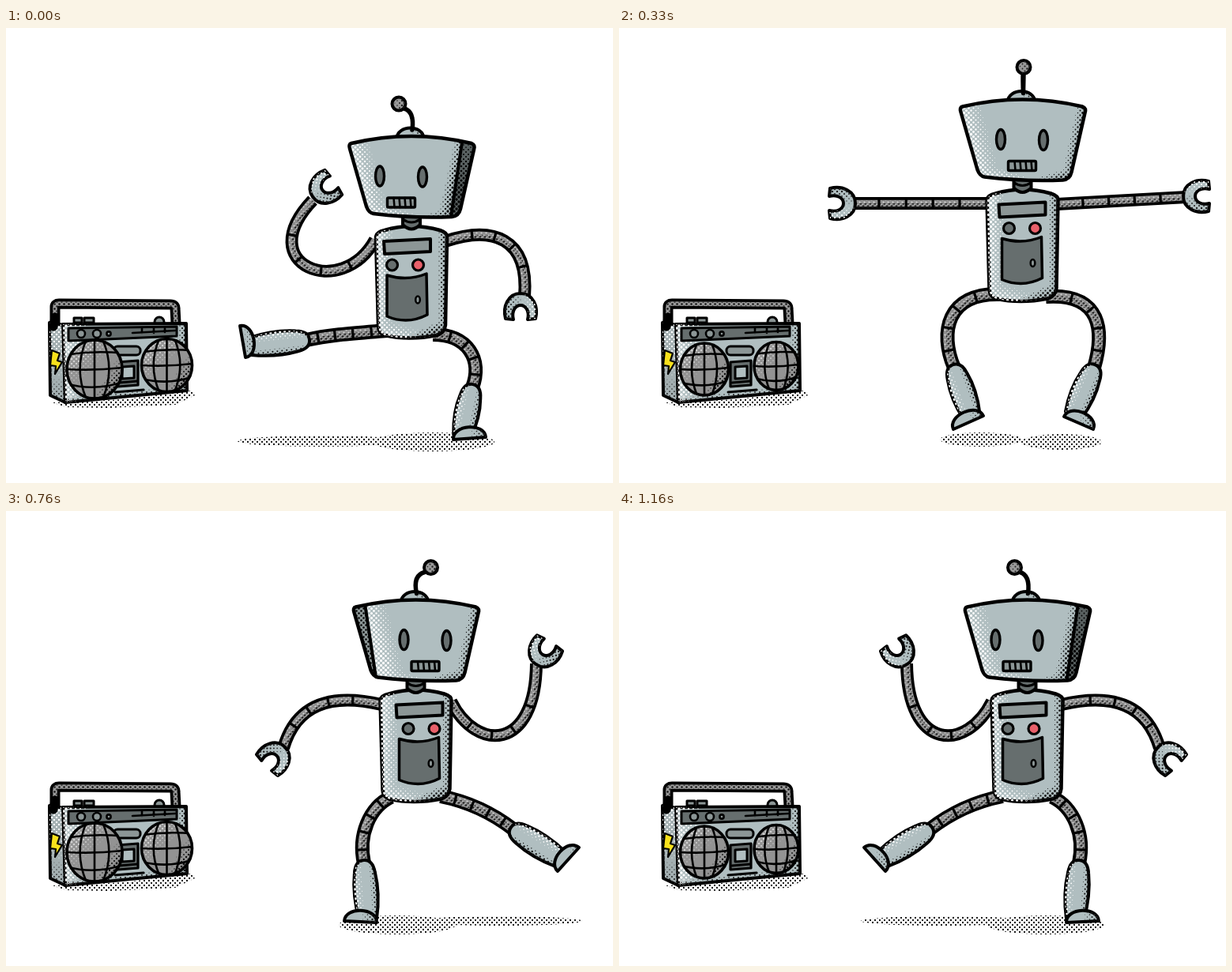
Recreate the animation shown at these times as an HTML page with a canvas. Size 768 by 576 pixels, loop 1260 ms.

```html
<!DOCTYPE html>
<html lang="en">
<head>
<meta charset="utf-8">
<title>Dancing robot</title>
<style>
html, body { margin: 0; width: 100%; height: 100%; overflow: hidden; background: #fff; }
canvas { display: block; width: 768px; height: 576px; }
</style>
</head>
<body>
<canvas id="stage" width="768" height="576"></canvas>
<script>
const ctx = document.getElementById('stage').getContext('2d');
const INK = '#000', METAL = '#b0bec0', TUBE = '#8e8e8e', DARK = '#666e6e', MID = '#8c9696', RED = '#e8606a';
const AXIS = 1035; // the mirrored x of a point is AXIS - x

// Arms: cubic curve. Hands: x, y, angle. Legs: cubic curve, ankle, heel, toe.
const kick = {
  at: [513, 0], side: 1,
  armL: [467, 268, 425, 345, 310, 300, 388, 218], handL: [402, 204, -35],
  armR: [556, 270, 615, 250, 662, 265, 656, 340], handR: [651, 353, 90],
  legL: [482, 383, 445, 386, 410, 388, 380, 395, 309, 403, 303, 417, 296, 377],
  legR: [540, 388, 585, 388, 603, 420, 590, 455, 577, 517, 566, 521, 607, 518],
  shade: [[400, 523, 107, 7], [540, 524, 78, 12]]
};
const step = {
  at: [516.5, -24.5], side: 1,
  armL: [472, 241, 440, 305, 365, 305, 364, 193], handL: [355, 180, -122],
  armR: [560, 245, 625, 230, 668, 245, 684, 300], handR: [694, 311, 45],
  legL: [485, 361, 450, 368, 420, 382, 393, 403, 333, 441, 337, 456, 310, 426],
  legR: [548, 362, 575, 375, 590, 410, 582, 446, 577, 517, 566, 521, 607, 519],
  shade: [[410, 519, 104, 6], [540, 524, 74, 12]]
};
const squat = {
  at: [510.5, -46.5], side: 0,
  armL: [465, 222, 408, 222, 353, 222, 294, 222], handL: [282, 222, -180],
  armR: [554, 223, 609, 220, 663, 217, 718, 214], handR: [731, 213, 0],
  legL: [482, 337, 415, 335, 405, 385, 424, 430, 446, 491, 461, 491, 423, 508],
  legR: [540, 340, 612, 335, 614, 385, 601, 430, 575, 490, 563, 492, 600, 508],
  shade: [[458, 521, 52, 9], [560, 524, 51, 10]]
};

const flip = v => v.map((n, i) => i % 2 ? n : AXIS - n);
const flipHand = h => [AXIS - h[0], h[1], 180 - h[2]];
const mirror = p => ({
  at: flip(p.at), side: -p.side,
  armL: flip(p.armR), handL: flipHand(p.handR), armR: flip(p.armL), handR: flipHand(p.handL),
  legL: flip(p.legR), legR: flip(p.legL),
  shade: p.shade.map(e => [AXIS - e[0], ...e.slice(1)]).reverse()
});
const mid = (a, b) => Array.isArray(a) ? a.map((n, i) => mid(n, b[i])) : (a + b) / 2;
const midHand = (a, b) => {
  const turn = ((b[2] - a[2]) % 360 + 540) % 360 - 180;
  return [...mid(a.slice(0, 2), b.slice(0, 2)), a[2] + turn / 2];
};
const between = (a, b) => Object.fromEntries(Object.keys(a).map(k =>
  [k, (k.startsWith('hand') ? midHand : mid)(a[k], b[k])]));

const kickR = mirror(kick), stepR = mirror(step);
const dipL = between(step, squat), dipR = between(stepR, squat);

// start time, pose, speaker swell
const LOOP = 1260;
const beats = [
  [0, kick, 1], [130, step, 1], [230, dipL, .5], [330, squat, 0], [430, dipR, 0], [530, stepR, 0],
  [630, kickR, 1], [760, stepR, 1], [860, dipR, .5], [960, squat, 0], [1060, dipL, 0], [1160, step, 0]
];

function shape(path, fill, width = 4) {
  if (fill) { ctx.fillStyle = fill; ctx.fill(path); }
  if (width) { ctx.lineWidth = width; ctx.strokeStyle = INK; ctx.stroke(path); }
}
const poly = (...v) => new Path2D('M' + v.join(' ') + 'Z');
const line = (d, w) => shape(new Path2D(d), null, w);
function oval(x, y, rx, ry = rx) {
  const p = new Path2D();
  p.ellipse(x, y, rx, ry, 0, 0, 7);
  return p;
}
function box(x, y, w, h, r = 0) {
  const p = new Path2D();
  p.roundRect(x, y, w, h, r);
  return p;
}

// Halftone screen inside a path; size(x, y) gives each dot's radius.
function dots(path, color, [x0, y0, x1, y1], size) {
  ctx.save();
  ctx.clip(path);
  ctx.fillStyle = color;
  ctx.beginPath();
  for (let y = y0, row = 0; y <= y1; y += 3, row++)
    for (let x = x0 + row % 2 * 3; x <= x1; x += 6) {
      const r = Math.min(1.7, size(x, y));
      if (r > .4) { ctx.moveTo(x + r, y); ctx.arc(x, y, r, 0, 7); }
    }
  ctx.fill();
  ctx.restore();
}
function screen(color, r) {
  const tile = document.createElement('canvas');
  tile.width = tile.height = 6;
  const g = tile.getContext('2d');
  g.fillStyle = color;
  for (const c of [1.5, 4.5]) { g.beginPath(); g.arc(c, c, r, 0, 7); g.fill(); }
  return ctx.createPattern(tile, 'repeat');
}
const whiteDots = screen('#d4d4d4', 1.1), blackDots = screen('#111', 1.25);

function tube(v, width, bands) {
  const [x0, y0, x1, y1, x2, y2, x3, y3] = v;
  const p = new Path2D(`M${x0} ${y0}C${x1} ${y1} ${x2} ${y2} ${x3} ${y3}`);
  const pass = (style, w) => { ctx.strokeStyle = style; ctx.lineWidth = w; ctx.stroke(p); };
  ctx.lineCap = 'butt';
  pass(INK, width);
  pass(TUBE, width - 7.5);
  pass(whiteDots, width - 8);
  ctx.save();
  ctx.translate(1.5, 2);
  pass(blackDots, width - 12);
  ctx.restore();
  for (const t of bands) {
    const u = 1 - t;
    const at = i => u * u * u * v[i] + 3 * u * u * t * v[i + 2] + 3 * u * t * t * v[i + 4] + t * t * t * v[i + 6];
    const slope = i => u * u * (v[i + 2] - v[i]) + 2 * u * t * (v[i + 4] - v[i + 2]) + t * t * (v[i + 6] - v[i + 4]);
    const dx = slope(0), dy = slope(1), k = (width / 2 - 1) / Math.hypot(dx, dy);
    const x = at(0), y = at(1);
    line(`M${x - dy * k} ${y + dx * k}L${x + dy * k} ${y - dx * k}`, 3.2);
  }
  ctx.lineCap = 'round';
}

const claw = new Path2D('M15-19C0-23-17-16-17 0C-17 16 0 23 15 19L16 9C5 12-2 6-2 0C-2-6 5-12 16-9Z');
function hand([x, y, deg]) {
  ctx.save();
  ctx.translate(x, y);
  ctx.rotate(deg * Math.PI / 180);
  shape(claw, METAL);
  dots(claw, '#222', [-18, -21, 16, 21], (a, b) => .5 + b / 22);
  dots(claw, '#fff', [-18, -21, 16, 21], (a, b) => .3 - b / 20);
  ctx.restore();
  shape(new Path2D(), null, 0);
}

function leg(v) {
  tube(v.slice(0, 8), 18, [.18, .4, .62, .84]);
  const [kx, ky, ex, ey, hx, hy, tx, ty] = v.slice(6);
  const len = Math.hypot(ex - kx, ey - ky), turn = Math.atan2(ey - ky, ex - kx);
  const shin = new Path2D(`M-4 0C-4-9 4-12 12-13C${len * .5}-17 ${len * .8}-14 ${len}-11L${len} 11` +
    `C${len * .8} 14 ${len * .5} 17 12 13C4 12-4 9-4 0Z`);
  const light = Math.cos(turn) < -.5 ? 1 : Math.sin(turn) > .7 ? 1 : -1;
  const area = [-4, -16, len, 16];
  ctx.save();
  ctx.translate(kx, ky);
  ctx.rotate(turn);
  shape(shin, METAL);
  dots(shin, '#fff', area, (x, y) => light * y / 9);
  dots(shin, '#111', area, (x, y) => (-light * y - 4) / 6);
  ctx.restore();
  // The sole is straight and the dome rises toward the knee.
  const span = Math.hypot(tx - hx, ty - hy);
  let nx = (hy - ty) / span, ny = (tx - hx) / span;
  if (nx * (kx - ex) + ny * (ky - ey) < 0) { nx = -nx; ny = -ny; }
  nx *= 19; ny *= 19;
  const foot = new Path2D(`M${hx} ${hy}C${hx + nx} ${hy + ny} ${tx + nx} ${ty + ny} ${tx} ${ty}Z`);
  shape(foot, METAL);
  const cx = (hx + tx) / 2, cy = (hy + ty) / 2;
  dots(foot, '#222', [cx - 30, cy - 30, cx + 30, cy + 30], x => (x - cx + 3) / 14);
}

function antenna(s) {
  const dome = new Path2D('M-19 140C-17 122 14 122 16 140Z');
  shape(dome, METAL);
  dots(dome, '#222', [-19, 124, 16, 140], x => (x + 3) / 12);
  line(`M1 129Q${4 * s} 106 ${-10 * s + 1} 102`, 5.5);
  if (!s) line('M1 128L1.5 104', 5.5);
  const ball = oval(-17.5 * s + 1.5, 96, 8.5);
  shape(ball, '#999');
  dots(ball, '#222', [-30, 86, 30, 106], x => .9 + (x + 17 * s) / 14);
}

function torso(s) {
  const body = new Path2D('M-45 264Q-44 258-34 256Q0 246 36 256Q45 259 45 264L43 376Q42 386 32 389Q-3 396-34 389Q-42 386-42 377Z');
  const area = [-46, 250, 46, 394];
  shape(body, METAL, 4.5);
  dots(body, '#fff', area, (x, y) => Math.max(2 - (x + 43) / 13, (y - 368) / 14 - (x + 15) / 40));
  dots(body, '#111', area, (x, y) => Math.max((x - 30) / 8, (y + x * .5 - 384) / 9));
  ctx.save();
  ctx.translate(-5 * s, 0);
  shape(poly(-30, 270, 29, 267, 29, 283, -29, 286), MID);
  const door = new Path2D('M-26 313Q0 321 24 311L25 363Q0 376-26 365Z');
  shape(door, DARK, 3.5);
  shape(oval(13 + (s < 0 ? 1 : 0), 344, 2.8, 4.5), MID, 2.6);
  ctx.translate(-2.5 * s, 0);
  shape(oval(-17, 300, 7), DARK, 3.2);
  shape(oval(16, 300, 7), RED, 3.2);
  ctx.restore();
}

function head(s) {
  const neck = new Path2D('M-11 234L-11 249Q0 260 11 249L11 234Z');
  shape(neck, DARK);
  line('M-11 242Q0 250 11 242', 3);
  antenna(s);
  const skull = new Path2D('M-76 146Q0 128 76 146Q81 148 79 154L62 229Q60 238 51 239Q0 241-48 235Q-54 234-57 226L-78 153Q-80 147-76 146Z');
  const area = [-80, 136, 81, 241];
  const left = y => -79 + (y - 148) * .27, right = y => 80 - (y - 148) * .22;
  shape(skull, METAL, 0);
  dots(skull, '#fff', area, (x, y) => {
    const edge = left(y) + (s < 0 ? -15 * s : 0);
    return Math.max(2 - (x - edge) / 17, (y - 222) / 9 - (x + 25) / 30);
  });
  dots(skull, '#111', area, (x, y) => {
    const edge = right(y) - (s > 0 ? 15 * s : 0);
    return Math.max(1.7 - (edge - x) / 9, (y + x * .3 - 238) / 8);
  });
  if (s) {
    const k = Math.sign(s), top = k * (80 - 15 * Math.abs(s)), low = k * (60 - 11 * Math.abs(s));
    const panel = poly(top, 138, k * 90, 138, k * 72, 245, low, 245);
    ctx.save();
    ctx.clip(skull);
    shape(panel, s > 0 ? '#596161' : MID);
    dots(panel, '#000', [-90, 136, 90, 242], (x, y) => s > 0 ? (y - 130) / 60 + .5 : 1.3);
    ctx.restore();
  }
  shape(skull, null, 4.5);
  ctx.save();
  ctx.translate(-12.5 * s - 1, 0);
  shape(oval(-26.5, 187.5, 5.5, 12.5), DARK, 3.4);
  shape(oval(27.5, 188.5, 5.5, 12.5), DARK, 3.4);
  shape(box(-17, 215, 35, 12, 1.5), MID, 3.4);
  for (let x = -9; x < 15; x += 7) line(`M${x} 215L${x + 1} 227`, 2.6);
  ctx.restore();
}

function robot(p) {
  const floor = new Path2D();
  for (const [x, y, rx, ry] of p.shade) {
    floor.moveTo(x + rx, y);
    floor.ellipse(x, y, rx, ry, 0, 0, 7);
  }
  dots(floor, '#111', [285, 509, 746, 538], () => 1.15);
  leg(p.legL);
  leg(p.legR);
  const bands = [.2, .4, .6, .8];
  tube(p.armL, 16, bands);
  tube(p.armR, 16, bands);
  hand(p.handL);
  hand(p.handR);
  ctx.save();
  ctx.translate(...p.at);
  torso(p.side);
  head(p.side);
  ctx.restore();
}

function speaker(x, y, rx, ry) {
  const cone = oval(x, y, rx, ry);
  shape(cone, '#939393', 0);
  const area = [Math.floor(x - rx), Math.floor(y - ry), x + rx, y + ry];
  dots(cone, '#d0d0d0', area, (a, b) => .3 - (a - x + b - y) / rx);
  dots(cone, '#111', area, (a, b) => (a - x + (b - y) * .6) / rx * 2.2 - .9);
  ctx.save();
  ctx.clip(cone);
  for (const k of [-.5, 0, .5]) {
    line(`M${x + k * rx * .6} ${y - ry}Q${x + k * rx * 1.5} ${y} ${x + k * rx * .6} ${y + ry}`, 2.6);
    line(`M${x - rx} ${y + k * ry}Q${x} ${y + k * ry * 1.4 + 2} ${x + rx} ${y + k * ry - 2}`, 2.6);
  }
  ctx.restore();
  shape(cone, null, 3.6);
}

function boombox(swell) {
  dots(poly(58, 474, 150, 470, 234, 459, 239, 465, 214, 477, 130, 481, 76, 480), '#111',
    [58, 459, 240, 482], () => 1.15);
  // handle
  const grip = new Path2D('M62 378L62 353Q62 349 67 349L208 350Q214 350 214 355L215 374');
  for (const [style, w] of [[INK, 13], ['#999', 5.5], [blackDots, 5]]) {
    ctx.lineWidth = w;
    ctx.strokeStyle = style;
    ctx.stroke(grip);
  }
  shape(box(86, 367, 10, 6), MID, 3);
  shape(box(99, 367, 12, 6), MID, 3);
  shape(oval(194, 372, 6), MID, 3);
  // case
  const flank = poly(55, 373, 73, 376, 75, 474, 56, 465);
  shape(flank, '#a3afb1');
  dots(flank, '#fff', [55, 373, 76, 474], (x, y) => 1.5 - (y - 373) / 70);
  dots(flank, '#222', [55, 373, 76, 474], (x, y) => (y - 425) / 40);
  const front = poly(72, 375, 228, 374, 229, 459, 75, 474);
  shape(front, METAL);
  dots(front, '#fff', [73, 374, 228, 474], x => 1.9 - (x - 73) / 22);
  dots(front, '#111', [73, 374, 229, 474], (x, y) => Math.max((x - 213) / 9, (y + x * .1 - 472) / 7));
  line('M60 378L62 366', 11);
  line('M61 377L62 366', 4);
  shape(poly(58, 408, 68, 412, 65, 421, 71, 423, 62, 438, 63, 428, 56, 427), '#f8e11c', 2.2);
  // controls
  shape(poly(79, 380, 216, 378, 216, 390, 150, 393, 79, 396), DARK, 3);
  for (const [x, r] of [[95, 5], [115, 5], [130, 2.6]]) shape(oval(x, 387, r), MID, 2.6);
  line('M160 386L214 383M172 380L172 386M187 380L187 386M201 379L201 385', 2.6);
  shape(box(136, 403, 34, 11, 5), MID, 3);
  shape(poly(141, 423, 167, 421, 167, 452, 141, 454), DARK, 3.2);
  shape(poly(147, 429, 162, 428, 162, 443, 147, 444), METAL, 3);
  line('M143 449L166 447M138 461L174 458', 3);
  speaker(108 + 4 * swell, 432, 30.5 + 4.5 * swell, 33 + 4 * swell);
  speaker(199 + 4.5 * swell, 428 - swell, 28 + 4 * swell, 30.5 + 3 * swell);
}

ctx.lineJoin = ctx.lineCap = 'round';
let shown;
const start = performance.now();
function tick() {
  const t = (performance.now() - start) % LOOP;
  const beat = beats.findLast(b => t >= b[0]);
  if (beat !== shown) {
    shown = beat;
    ctx.fillStyle = '#fff';
    ctx.fillRect(0, 0, 768, 576);
    boombox(beat[2]);
    robot(beat[1]);
  }
  requestAnimationFrame(tick);
}
tick();
</script>
</body>
</html>
```
